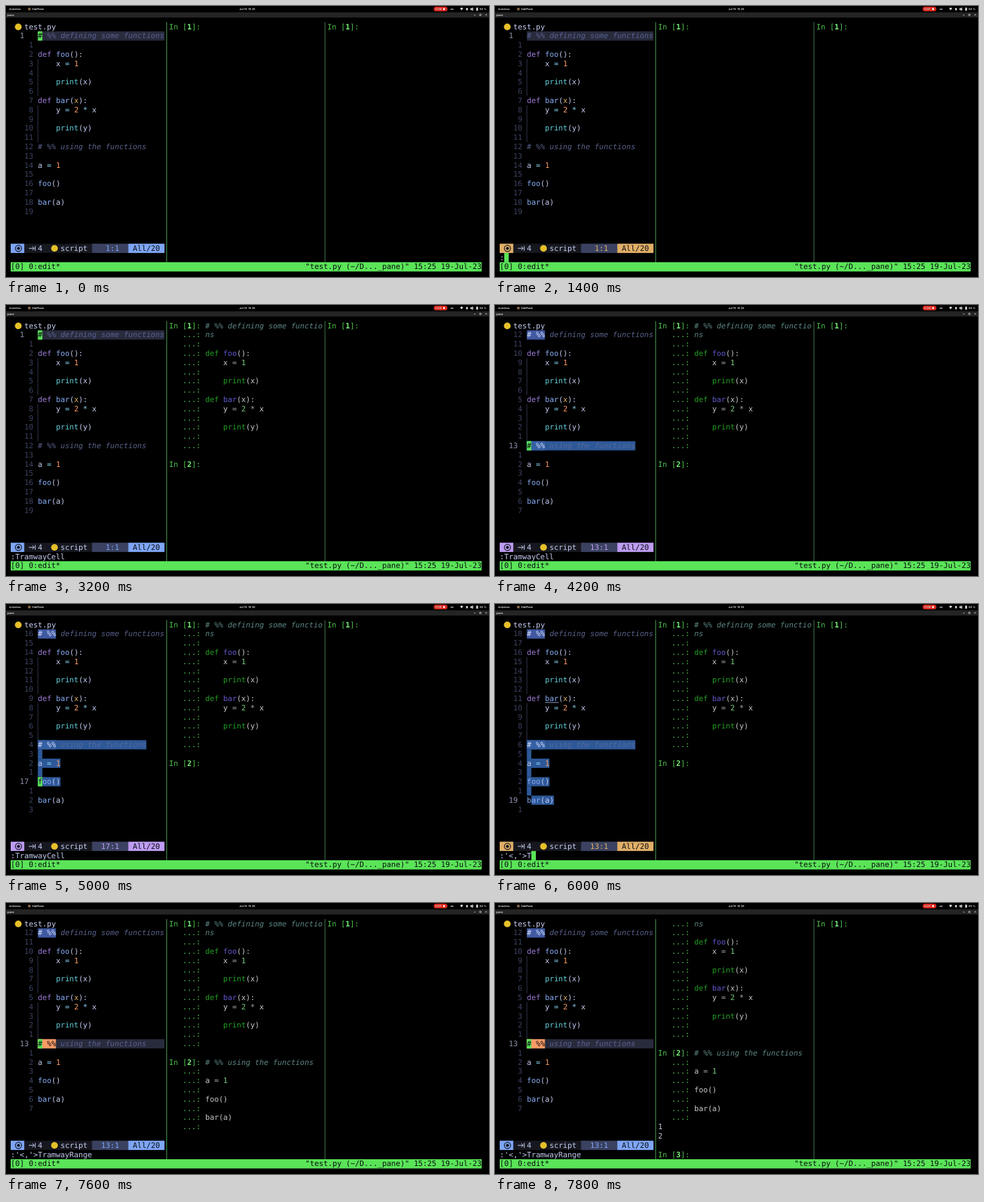
An HTML page that plays this animation: 720 by 405 pixels, repeating every 8000 ms.

```html
<!DOCTYPE html>
<html lang="en">
<head>
<meta charset="utf-8">
<title>Terminal session</title>
<style>
  html, body { margin: 0; width: 100%; height: 100%; overflow: hidden; background: #000; }
  svg { display: block; width: 720px; height: 405px; text-rendering: geometricPrecision; }
  text { white-space: pre; }
  .term { font: 11.2px "DejaVu Sans Mono", "Noto Sans Mono", monospace; }
  .bar { font: 600 4.2px Inter, "Open Sans", sans-serif; fill: #e4e4e4; }
  .n { fill: #c4ccf0; }
  .c { fill: #59618a; font-style: italic; }
  .k { fill: #9d7cd8; }
  .f, .h { fill: #86aaf2; }
  .o { fill: #fb9c66; }
  .p { fill: #62cfdc; }
  .q { fill: #e0af68; }
  .e { fill: #89d5f2; }
  .g { fill: #4ec24c; }
  .b { fill: #78f07a; font-weight: bold; }
  .shell .n, .shell .h, .shell .q { fill: #c4c8cc; }
  .shell .c { fill: #5c8684; }
  .shell .k, .shell .p { fill: #22a022; }
  .shell .f { fill: #6258cc; }
  .shell .o { fill: #74c87c; }
  .shell .e { fill: #a4a8a8; }
  .d { fill: #0b0e12; }
  .w { fill: #d6def8; }
  .s { fill: #56699c; font-style: italic; }
  .l { fill: #596190; font-style: italic; }
  .num { fill: #3b4261; }
  .cur { fill: #8c92ac; }
</style>
</head>
<body>
<svg id="stage" viewBox="0 0 720 405" xmlns="http://www.w3.org/2000/svg"></svg>
<script>
const LOOP = 8000;
const CW = 6.742, RH = 13.8, X0 = 7, Y0 = 24.1;
const MID = 35, RIGHT = 70, CODE = 6;
const GREEN = '#5ae458', DARK = '#17181f', VISUAL = '#2d5898';
const MODE = { N: '#7ea5f5', C: '#e0af68', V: '#bd9cf2' };

// Each segment starts with its style letter.
const code = [
  'c# %% defining some functions', '',
  'kdef |ffoo|n():', 'n    x |e= |o1', '', 'n    |pprint|n(x)', '',
  'kdef |fbar|n(|qx|n):', 'n    y |e= |o2 |e* |nx', '', 'n    |pprint|n(y)', '',
  'c# %% using the functions', '', 'na |e= |o1', '', 'hfoo|n()', '', 'hbar|n(a)', ''
];
const menu = ['TramwayCell', 'TramwayConfig', 'TramwayRange'];
const range = ":'<,'>";

// Each step changes only the fields it names.
const steps = [
  [0, { mode: 'N', line: 1, cmd: '', pick: -1, from: 0, found: false, out: 0, clock: '15:25' }],
  [1400, { mode: 'C', cmd: ':' }],
  [1600, { cmd: ':T' }],
  [1800, { cmd: ':Tr' }],
  [2000, { cmd: ':Tra' }],
  [2400, { cmd: ':' + menu[0], pick: 0, at: 0 }],
  [2800, { mode: 'N', pick: -1 }],
  [3000, { out: 1 }],
  [3200, { out: 2 }],
  [3800, { line: 13, found: true }],
  [4200, { mode: 'V', from: 13 }],
  ...[14, 15, 16, 17, 18, 19].map((line, i) => [4400 + 200 * i, { line }]),
  [5600, { mode: 'C', cmd: range }],
  [6000, { cmd: range + 'T' }],
  [6200, { cmd: range + 'Tr' }],
  [6400, { cmd: range + 'Tra' }],
  [6600, { cmd: range + menu[0], pick: 0, at: 5 }],
  [7000, { cmd: range + menu[1], pick: 1 }],
  [7200, { cmd: range + menu[2], pick: 2 }],
  [7400, { mode: 'N', line: 13, from: 0, pick: -1 }],
  [7600, { out: 3 }],
  [7800, { out: 4, clock: '15:26' }]
];
const states = [];
for (const [at, change] of steps) {
  states.push({ ...states[states.length - 1], ...change, start: at });
}

const esc = s => s.replace(/&/g, '&amp;').replace(/</g, '&lt;');
const cx = col => X0 + col * CW;
const ry = row => Y0 + row * RH;
const box = (x, y, w, h, fill) =>
  `<rect x="${x}" y="${y}" width="${w}" height="${h}" fill="${fill}"/>`;
const cells = (row, col, n, fill) => box(cx(col), ry(row), n * CW, RH, fill);
const put = (row, col, s, cls = 'n', extra = '') =>
  `<text x="${cx(col).toFixed(2)}" y="${(ry(row) + 10.5).toFixed(2)}" class="${cls}" ${extra}>${esc(s)}</text>`;
const plain = src => src.split('|').map(s => s.slice(1)).join('');

function rich(row, col, src) {
  let out = '';
  for (const seg of src ? src.split('|') : []) {
    const s = seg.slice(1), lead = s.length - s.trimStart().length;
    if (s.trim()) out += put(row, col + lead, s.trim(), seg[0]);
    col += s.length;
  }
  return out;
}

function topBar(sec, clock) {
  const label = (x, y, s, size = 4.2) =>
    `<text class="bar" x="${x}" y="${y}" style="font-size:${size}px">${s}</text>`;
  return label(4.8, 6, 'Activities', 3.8) +
    box(33, 2.8, 3.6, 3.6, '#8a6a4c') + label(38.8, 6, 'OakPane', 4.1) +
    label(348, 6, 'Jul 19&#160; ' + clock, 4) +
    '<rect x="637.5" y="1" width="20.5" height="7" rx="3.5" fill="#d8261c"/>' +
    label(640, 6, '0:0' + sec, 4.2) + '<circle cx="653" cy="4.5" r="1.5" fill="#fff"/>' +
    label(662.5, 6, 'en', 4) +
    '<path d="M677 3.5q2.2-2 4.4 0L679.2 6.5z" fill="#ddd"/>' +
    box(686, 3, 2.4, 3.4, '#ddd') +
    '<path d="M692.5 3.8h1.3l1.7-1.4v4.6l-1.7-1.4h-1.3zM696.4 3v3.4" fill="#ddd" stroke="#ddd" stroke-width=".5"/>' +
    box(701, 2.5, 2.6, 4.4, '#ddd') + label(706, 6, '60 %', 4) +
    box(0, 9.4, 720, 7.8, '#242424') + label(2, 14.6, 'pane', 4.1) +
    '<path d="M697.6 13.6h2.4M706 12.2h2.2v2.2h-2.2zM714.6 12.2l2.2 2.2m0-2.2l-2.2 2.2" fill="none" stroke="#ddd" stroke-width=".7"/>';
}

function editor(st) {
  const visual = st.from > 0;
  let out = `<circle cx="18.3" cy="31.2" r="5" fill="#e6c02a"/>` + put(0, 3, 'test.py');
  code.forEach((src, i) => {
    const line = i + 1, row = line, text = plain(src);
    const here = line === st.line, heading = src[0] === 'c';
    const chosen = visual && line >= st.from && line <= st.line;
    const cursor = here && st.mode !== 'C';
    const gap = Math.abs(line - st.line);

    out += here ? put(row, 2, String(line), 'cur') : put(row, 5 - String(gap).length, String(gap), 'num');
    if ((line > 3 && line < 8) || (line > 8 && line < 13)) {
      out += box(47.2, ry(row), .9, RH, '#363b50');
    }
    if (here && !visual) out += cells(row, CODE, 28, '#282b3c');
    if (chosen) out += cells(row, CODE, Math.max(1, text.length), VISUAL);
    if (chosen && here && line !== st.from) out += cells(row, CODE, 1, '#000');
    if (heading && st.found) {
      const active = here && !visual;
      out += cells(row, CODE, 4, active ? '#fb9c66' : chosen ? '#3560a4' : '#4059a2');
    }
    if (cursor) out += cells(row, CODE, 1, GREEN);

    if (heading) {
      const hit = st.found ? (here && !visual ? 'd' : 'w') : here ? 'l' : 'c';
      out += put(row, CODE, '#', cursor ? 'd' : hit) + put(row, CODE + 2, '%%', hit) +
        put(row, CODE + 5, text.slice(5), chosen ? 's' : here ? 'l' : 'c');
    } else {
      out += rich(row, CODE, src);
      if (cursor && text) out += put(row, CODE, text[0], 'd');
    }
  });
  if (visual && st.line === 19) out += box(cx(CODE + 4), ry(8) + 12.2, 3 * CW, .9, '#a4b4e0');
  return out;
}

function statusLine(st) {
  const tint = MODE[st.mode], y = ry(24) + RH / 2;
  const pos = (st.from && st.mode === 'C' ? st.from : st.line) + ':1';
  return cells(24, 0, 34, DARK) + cells(24, 0, 3, tint) +
    `<circle cx="18.6" cy="${y}" r="4.6" fill="none" stroke="#14161e" stroke-width="1.2"/>` +
    `<circle cx="18.6" cy="${y}" r="2.2" fill="#14161e"/>` +
    `<path d="M34 ${y}h8.2m-3-2.8l3 2.8-3 2.8M43.6 ${y - 3.6}v7.2" fill="none" stroke="#c4ccf0" stroke-width="1"/>` +
    put(24, 6, '4') + `<circle cx="72.3" cy="${y}" r="5" fill="#e6c02a"/>` + put(24, 11, 'script') +
    cells(24, 18, 8, '#3b4261') + put(24, 24 - pos.length, pos, '', `fill="${tint}"`) +
    cells(24, 26, 8, tint) + put(24, 27, 'All/20', 'd');
}

function commandLine(st) {
  let out = '';
  if (st.pick >= 0) {
    menu.forEach((name, i) => {
      out += cells(22 + i, st.at, 16, i === st.pick ? '#3a4060' : DARK) +
        put(22 + i, st.at + 1, name);
    });
  }
  out += put(25, 0, st.cmd);
  if (st.mode === 'C') out += cells(25, st.cmd.length, 1, GREEN);
  return out;
}

const prompt = (row, col, n) =>
  put(row, col, 'In [', 'g') + put(row, col + 4, String(n), 'b') + put(row, col + 5, ']:', 'g');

function shell(stage) {
  const rows = [];
  const more = src => rows.push(r => put(r, MID + 3, '...:', 'g') + rich(r, MID + 8, src));
  const ask = (n, src = '') => rows.push(r => prompt(r, MID, n) + rich(r, MID + 8, src));
  const print = s => rows.push(r => put(r, MID, s));

  if (stage === 0) ask(1);
  else {
    ask(1, code[0].slice(0, 27));
    more('c' + code[0].slice(27));
    code.slice(1, 12).forEach(more);
    more('');
    if (stage > 1) {
      print('');
      ask(2, stage > 2 ? code[12] : '');
    }
    if (stage > 2) code.slice(13).forEach(more);
    if (stage > 3) {
      ['1', '2', ''].forEach(print);
      ask(3);
    }
  }
  const skip = Math.max(0, rows.length - 26);
  return '<g class="shell">' + rows.slice(skip).map((draw, r) => draw(r)).join('') + '</g>';
}

function frame() {
  return box(239.1, Y0, 1, 26 * RH, '#479c52') + box(475, Y0, 1, 26 * RH, '#3c7446') +
    box(X0, ry(26), 702, RH, GREEN) + put(26, 0, '[0] 0:edit*', 'd') +
    put(26, 65.15, '"test.py (~/D..._pane)" 15:25 19-Jul-23', 'd');
}

const stage = document.getElementById('stage');
let shown = '';

function tick() {
  const t = performance.now() % LOOP;
  const sec = Math.floor(t / 1000);
  let i = states.length - 1;
  while (states[i].start > t) i--;
  const key = i + '/' + sec;
  if (key !== shown) {
    shown = key;
    const st = states[i];
    stage.innerHTML = box(0, 0, 720, 405, '#000') + topBar(sec, st.clock) +
      '<g class="term">' + editor(st) + statusLine(st) + commandLine(st) +
      shell(st.out) + prompt(0, RIGHT, 1) + frame() + '</g>';
  }
  requestAnimationFrame(tick);
}
tick();
</script>
</body>
</html>
```
